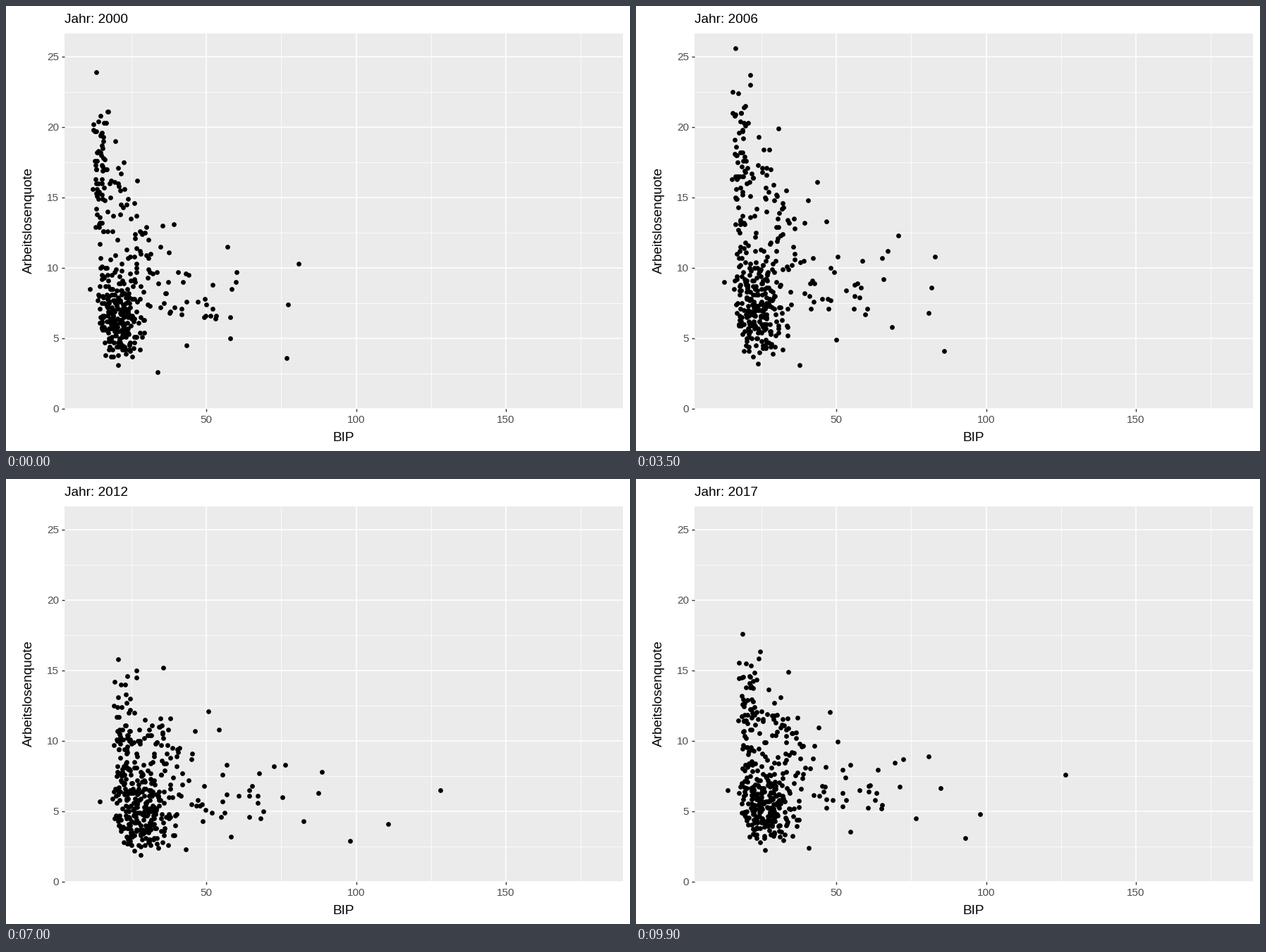
A matplotlib script for the animation above (10000 ms loop, 885 by 632 pixels).

```python
import numpy as np
import matplotlib.pyplot as plt
from matplotlib.animation import FuncAnimation
from matplotlib.patches import Rectangle

W, H, DPI = 885, 632, 64
PT = 72 / DPI                      # points per pixel
LEFT, RIGHT, TOP, BOTTOM = 83, 875, 39, 571.5
FRAMES, INTERVAL = 100, 100
YEARS = 18

plt.rcParams["font.family"] = "Liberation Sans"
rng = np.random.default_rng(11)

# Year axis as a column, so that rules broadcast over districts
t = np.arange(YEARS)[:, None]
share = t / (YEARS - 1)
wave = 0.31 * np.exp(-((t - 4.9) / 2) ** 2)     # unemployment peak around 2005
spread = 1 + 0.3 * np.clip((t - 4) / 6, 0, 1)


def px(bip):
    return 71.5 + 4.25 * bip


def py(rate):
    return BOTTOM - 20 * rate


def bip_path(start, end):
    return start + (end - start) * share ** 1.2


def rate_path(start, end):
    return start + (end - start) * share + start * wave


def soft(z):
    """Normal scores with the far tails pulled in."""
    return z / np.sqrt(1 + (z / 3) ** 2)


def cloud(n, bip, bip_sd, rate, rate_sd, corr):
    """Log-normal cloud of n districts; bip and rate are (2000, 2017) medians."""
    zx, za, zb = rng.normal(size=(3, n))
    zy = np.cos(0.6 * share) * za + np.sin(0.6 * share) * zb
    zy = corr * zx + np.sqrt(1 - corr ** 2) * zy
    zy = zy + rng.normal(0, 0.07, (YEARS, n))
    zx = zx + rng.normal(0, 0.05, (YEARS, n))
    x = bip_path(*bip) * np.exp(bip_sd * soft(zx))
    y = rate_path(*rate) * np.exp(rate_sd * spread * soft(zy))
    return np.dstack([x, y])


def single(bip, rate):
    return np.dstack([bip, rate_path(*rate)])


# Districts that stand apart: BIP and rate in 2000, then in 2017
APART = [
    (76.9, 3.6, 109.1, 2.6), (77.3, 7.4, 92.5, 5.9),
    (57.9, 6.5, 138.0, 3.1), (60.1, 9.7, 84.7, 7.7),
    (57.0, 11.5, 104.8, 6.3), (59.8, 9.0, 79.2, 7.9),
    (58.5, 8.5, 84.0, 5.0), (58.1, 5.0, 95.0, 4.0),
    (43.5, 4.5, 66.0, 2.6), (33.7, 2.6, 48.0, 2.2),
    (20.5, 3.1, 32.0, 1.4), (11.2, 8.5, 16.2, 4.5),
]
lead_bip = np.interp(t, [0, 4, 8, 12, 14, 15, 16, 17],
                     [80.8, 73.8, 92.3, 128, 136.6, 114.7, 180.5, 172.2])

states = np.concatenate([
    cloud(240, (20.2, 31.5), 0.21, (6.4, 4.1), 0.28, -0.2),
    cloud(62, (14.6, 27.0), 0.12, (16.5, 7.6), 0.18, -0.1),
    cloud(22, (21.0, 38.0), 0.17, (15.3, 7.1), 0.17, -0.2),
    cloud(54, (31.5, 46.5), 0.20, (9.5, 6.4), 0.28, -0.35),
    cloud(10, (51.0, 74.0), 0.07, (7.0, 5.2), 0.17, 0.0),
    *[single(bip_path(b0, b1), (r0, r1)) for b0, r0, b1, r1 in APART],
    single(lead_bip, (10.3, 4.9)),
], axis=1).round(1)
states = np.concatenate([states, states[:1]])   # back to the first year

# Moves take three steps up to 2011 and two afterwards
arrive = np.concatenate([5 + 6 * np.arange(11), np.arange(70, 101, 5)])
leave = arrive - np.where(arrive < 70, 3, 2)
times = np.column_stack([leave, arrive]).ravel()
phases = np.column_stack([np.arange(YEARS), np.arange(YEARS) + 1]).ravel()

fig = plt.figure(figsize=(W / DPI, H / DPI), dpi=DPI, facecolor="white")
ax = fig.add_axes([0, 0, 1, 1])
ax.set_xlim(0, W)
ax.set_ylim(H, 0)
ax.axis("off")

panel = Rectangle((LEFT, TOP), RIGHT - LEFT, BOTTOM - TOP,
                  fc="#EBEBEB", ec="none")
ax.add_patch(panel)


def line(x, y, color, width, inside=True):
    ln, = ax.plot(x, y, color=color, lw=width * PT, solid_capstyle="butt")
    if inside:
        ln.set_clip_path(panel)


def label(x, y, text, size, color="black", **kw):
    return ax.text(x, y, text, size=size * PT, color=color, va="baseline", **kw)


for start, width in ((2.5, 0.8), (0, 1.5)):
    for r in np.arange(start, 26, 5):
        line([LEFT, RIGHT], [py(r)] * 2, "white", width)
    for b in np.arange(start * 10, 180, 50):
        line([px(b)] * 2, [TOP, BOTTOM], "white", width)

dots, = ax.plot([], [], "o", color="black", ms=6.8 * PT, mew=0)

for r in range(0, 26, 5):
    line([LEFT - 4.5, LEFT], [py(r)] * 2, "#333333", 1.4, inside=False)
    label(75, py(r) + 5.5, str(r), 15.2, "#4D4D4D", ha="right")
for b in (50, 100, 150):
    line([px(b)] * 2, [BOTTOM, BOTTOM + 4.5], "#333333", 1.4, inside=False)
    label(px(b), 592.5, str(b), 15.2, "#4D4D4D", ha="center")

label(478.7, 617.5, "BIP", 19, ha="center")
label(36.5, 305, "Arbeitslosenquote", 19, ha="center",
      rotation=90, rotation_mode="anchor")
title = label(83, 24.5, "", 19, ha="left")


def draw(frame):
    phase = np.interp(frame, times, phases)
    k = int(phase)
    mix = phase - k
    pos = (1 - mix) * states[k] + mix * states[k + 1]
    dots.set_data(px(pos[:, 0]), py(pos[:, 1]))
    title.set_text(f"Jahr: {2000 + int(np.ceil(phase - 0.51))}")
    return dots, title


anim = FuncAnimation(fig, draw, frames=FRAMES, interval=INTERVAL,
                     repeat=True, repeat_delay=0, blit=False)
plt.show()
```
